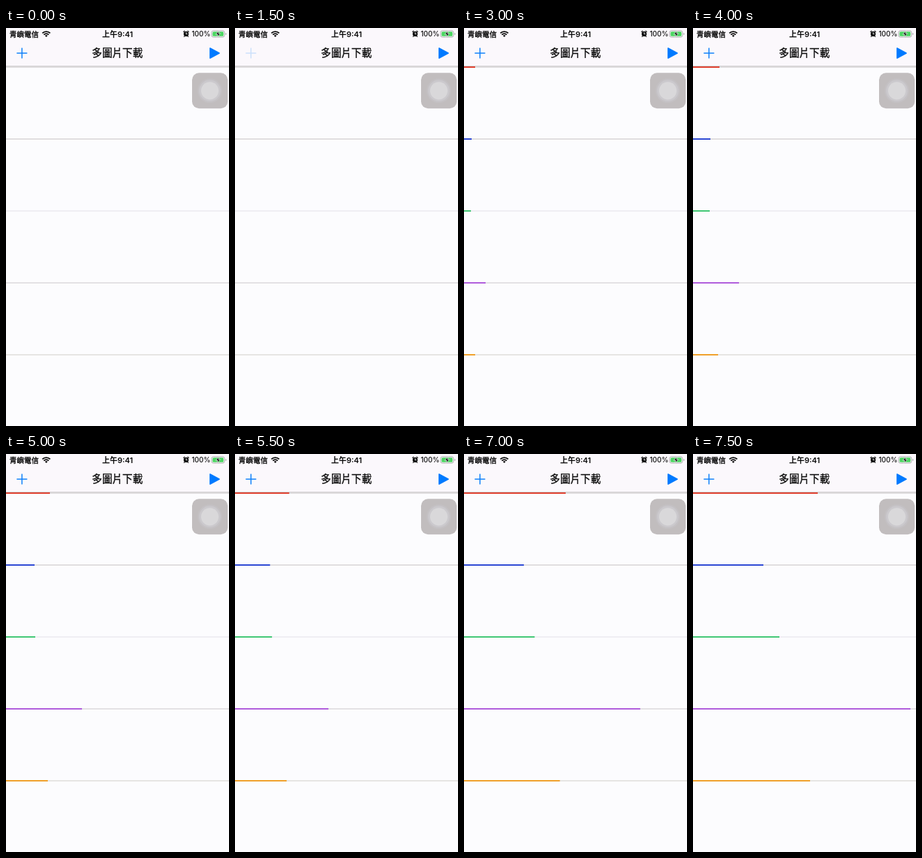
Recreate the animation shown at these times as an HTML page. Size 320x570 px, loop 8 s.

```html
<!DOCTYPE html>
<html lang="zh-Hant">
<head>
<meta charset="utf-8">
<title>多圖片下載</title>
<style>
html, body { margin: 0; width: 100%; height: 100%; overflow: hidden; background: #fcfcfe; }
svg { display: block; width: 320px; height: 570px; }
text { font-family: Inter, "Noto Sans CJK TC", "Noto Sans CJK JP", "Noto Sans CJK", sans-serif; fill: #0b0b0b; }
.firm { stroke: #0b0b0b; stroke-width: .35; }
</style>
</head>
<body>
<svg viewBox="0 0 320 570" xmlns="http://www.w3.org/2000/svg">
  <rect width="320" height="570" fill="#fcfcfe"/>
  <rect width="320" height="54" fill="#fbf8fc"/>
  <rect y="54" width="320" height="1" fill="#d0ced0"/>

  <!-- status bar -->
  <text class="firm" x="5" y="12.6" font-size="10.5" font-weight="400">青嶼電信</text>
  <g fill="none" stroke="#0b0b0b" stroke-width="1.9">
    <path d="M52.2 7.4a8 8 0 0 1 11.2 0"/>
    <path d="M54.3 9.6a5 5 0 0 1 7 0"/>
  </g>
  <path d="M55.9 11a2.8 2.8 0 0 1 3.8 0l-1.9 2z" fill="#0b0b0b"/>
  <text x="160" y="12.6" font-size="11" font-weight="600" text-anchor="middle">上午9:41</text>
  <g stroke="#0b0b0b" fill="none" stroke-linecap="round">
    <circle cx="258.5" cy="8.4" r="3.6" fill="#0b0b0b" stroke="none"/>
    <path d="M254.8 5.5l1.4-1.3M262.2 5.5l-1.4-1.3M256.2 11.7l-.6.8M260.8 11.7l.6.8" stroke-width="1.1"/>
    <path d="M258.5 6.4v2.2h1.6" stroke="#fff" stroke-width=".8"/>
  </g>
  <text x="293.4" y="12.4" font-size="10" font-weight="500" text-anchor="end">100%</text>
  <rect x="295" y="3.9" width="18.6" height="9.2" rx="2.6" fill="#fbf8fc" stroke="#a6a4a8" stroke-width=".9"/>
  <rect x="296.4" y="5.2" width="15.8" height="6.6" rx="1.5" fill="#4cd662"/>
  <path d="M315 7v3q1.2-.4 1.2-1.5t-1.2-1.5z" fill="#a6a4a8"/>
  <path d="M305.8 3.7l-4.8 5.4h2.8l-1 4.2 4.8-5.6h-2.8z" fill="#0b0b0b" stroke="#fbf8fc" stroke-width=".7"/>

  <!-- navigation bar -->
  <path id="plus" d="M15.4 36h15M22.9 28.5v15" stroke-width="1.5" fill="none"/>
  <text class="firm" x="159.8" y="41.4" font-size="14.6" font-weight="500" text-anchor="middle">多圖片下載</text>
  <path d="M293 29v14l13-7z" fill="#007aff" stroke="#007aff" stroke-width="1.8" stroke-linejoin="round"/>

  <g id="bars"></g>

  <!-- floating button -->
  <rect x="267" y="64.3" width="51.2" height="51" rx="10" fill="#c1bdbe"/>
  <circle cx="292.5" cy="89.8" r="17.5" fill="#c4c1c4"/>
  <circle cx="292.5" cy="89.8" r="15.3" fill="#cbc9cd"/>
  <circle cx="292.5" cy="89.8" r="12.6" fill="#d9d8da"/>
</svg>
<script>
const LOOP = 8000, STEP = 500, BEND = 25;
const times = [2500, 3000, 4000, 5000, 6000, 7500];
const rows = [
  { color: '#e0402f', track: '#dedcde', ends: [5, 16, 38, 63, 95, 179] },
  { color: '#2b47d4', track: '#e0dedf', ends: [3, 11, 25, 41, 61, 101] },
  { color: '#40c774', track: '#efeef3', ends: [2, 10, 24, 42, 66, 124] },
  { color: '#af5cdc', track: '#e3e1e4', ends: [14, 31, 66, 109, 164, 312] },
  { color: '#f0a02a', track: '#e6e5e3', ends: [5, 16, 36, 60, 90.5, 168] }
];
const plus = document.getElementById('plus');
const bars = document.getElementById('bars');

function addRect(y, width, fill) {
  const r = document.createElementNS('http://www.w3.org/2000/svg', 'rect');
  const attrs = { x: 0, y, width, height: 2, fill };
  for (const k in attrs) r.setAttribute(k, attrs[k]);
  bars.appendChild(r);
  return r;
}

rows.forEach((row, i) => {
  const y = 55 + 103 * i;
  addRect(y, 320, row.track);
  row.bar = addRect(y, 0, row.color);
});

// Downloads speed up, so lengths grow geometrically between points.
function lengthAt(ends, t) {
  if (t < times[0]) return 0;
  let i = 0;
  while (i < times.length - 2 && t >= times[i + 1]) i++;
  const p = Math.min(1, (t - times[i]) / (times[i + 1] - times[i]));
  const a = ends[i] + BEND, b = ends[i + 1] + BEND;
  return a * Math.pow(b / a, p) - BEND;
}

function draw(now) {
  const t = Math.floor(now % LOOP / STEP) * STEP;
  plus.setAttribute('stroke', t === 1500 ? '#cbe0fb' : '#0f80fa');
  for (const row of rows) row.bar.setAttribute('width', lengthAt(row.ends, t).toFixed(1));
}

const start = performance.now();
function tick() {
  draw(performance.now() - start);
  requestAnimationFrame(tick);
}
tick();
</script>
</body>
</html>
```
